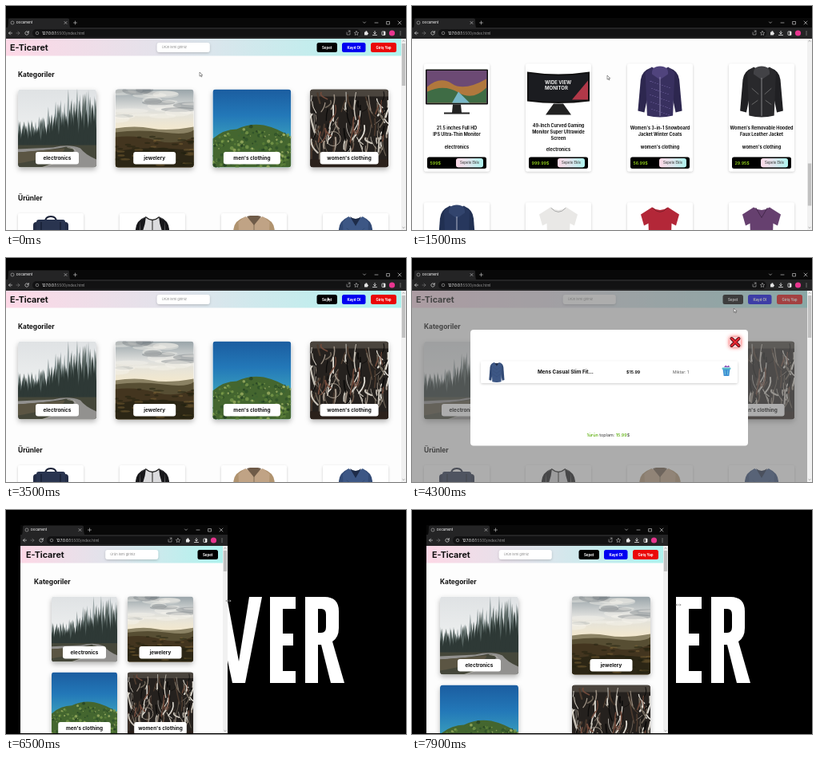
Recreate the animation shown at these times as an HTML page. Size 500 px wide and 281 px high, loop 8 s.

```html
<!DOCTYPE html>
<html lang="tr">
<head>
<meta charset="utf-8">
<title>E-Ticaret</title>
<style>
html, body { margin: 0; width: 100%; height: 100%; overflow: hidden; background: #000; }
#stage { display: block; width: 100vw; height: 100vh; font-family: Inter, "Open Sans", sans-serif; }
</style>
</head>
<body>
<svg id="stage" viewBox="0 0 500 281">
  <defs id="defs"></defs>
  <g id="scene"></g>
</svg>
<script>
const LOOP = 8000, STEP = 100;

// ---- drawing helpers ----
const rect = (x, y, w, h, fill, r = 0, more = '') =>
  `<rect x="${x}" y="${y}" width="${w}" height="${h}" rx="${r}" fill="${fill}" ${more}/>`;
const path = (d, fill = 'none', more = '') => `<path d="${d}" fill="${fill}" ${more}/>`;
const line = (d, color, width = .7) =>
  path(d, 'none', `stroke="${color}" stroke-width="${width}" stroke-linecap="round" stroke-linejoin="round"`);
const circle = (x, y, r, fill, more = '') => `<circle cx="${x}" cy="${y}" r="${r}" fill="${fill}" ${more}/>`;
const text = (x, y, size, str, fill = '#111', weight = 700, anchor = 'start') =>
  `<text x="${x}" y="${y + size * .36}" font-size="${size}" fill="${fill}" font-weight="${weight}" text-anchor="${anchor}">${str}</text>`;
const move = (x, y, body, scale = 1) => `<g transform="translate(${x} ${y}) scale(${scale})">${body}</g>`;
const mirror = body => body + `<g transform="translate(82 0) scale(-1 1)">${body}</g>`;
const use = id => `<use href="#${id}"/>`;
const SHADOW = 'filter="url(#shadow)"';

function random(seed) {
  return () => (seed = (seed * 16807) % 2147483647) / 2147483647;
}
const repeat = (n, fn) => Array.from({ length: n }, (_, i) => fn(i)).join('');
const clamp = v => Math.min(1, Math.max(0, v));

// keys: [time, ...values], linear between neighbours
function at(keys, t) {
  let i = 0;
  while (i < keys.length - 2 && t >= keys[i + 1][0]) i++;
  const [a, b] = [keys[i], keys[i + 1]];
  const k = clamp((t - a[0]) / (b[0] - a[0]));
  return a.slice(1).map((v, j) => v + (b[j + 1] - v) * k);
}

// ---- category pictures, 98 x 98 ----
function forest() {
  const rnd = random(11);
  const trees = (n, color, size) => repeat(n, i => {
    const x = i / (n - 1) * 98 + rnd() * 3;
    const h = (30 + 30 * clamp((x - 25) / 42)) * size * (.78 + rnd() * .35);
    return path(`M${x} ${72 - h}L${x + 4.5} 74H${x - 4.5}Z`, color);
  });
  return rect(0, 0, 98, 98, 'url(#mist)') + trees(20, '#9aa5a6', 1.2) + trees(28, '#55625f', 1) +
    trees(32, '#2e3936', .8) + rect(0, 70, 98, 28, '#45473a') +
    path('M0 79Q38 77 60 72Q76 74 66 82Q52 91 30 98H98V88Q84 82 78 74Q64 68 44 73L0 75Z', '#92918f') +
    line('M30 98Q62 88 71 80Q76 75 62 73', '#c9c6bd', .6) + path('M0 79Q40 76 58 74Q62 82 0 93Z', '#5b5543');
}
function valley() {
  const rnd = random(23);
  return rect(0, 0, 98, 98, 'url(#clouds)') +
    repeat(26, i => `<ellipse cx="${rnd() * 98}" cy="${rnd() * 42}" rx="${8 + rnd() * 16}" ry="${1.5 + rnd() * 4}" fill="${i % 3 ? '#f7f5ee' : '#6e777b'}" opacity=".4"/>`) +
    path('M0 49Q25 45 45 49T98 47V98H0Z', '#8b8264') + path('M0 54Q30 50 60 54T98 51V98H0Z', '#574e33') +
    path('M0 60Q25 57 50 64T98 60V98H0Z', '#43351f') + path('M0 78Q40 70 98 77V98H0Z', '#2c2615') +
    repeat(60, i => `<ellipse cx="${rnd() * 98}" cy="${58 + rnd() * 38}" rx="${2 + rnd() * 5}" ry="1.2" fill="${i % 3 ? '#21200f' : '#7c6235'}" opacity=".5"/>`);
}
function coast() {
  const rnd = random(7);
  const greens = ['#2c4f29', '#5c8038', '#7d9c4c', '#233f22', '#a3b566', '#3d6433'];
  return rect(0, 0, 98, 98, 'url(#sea)') + path('M0 62Q14 50 30 50Q46 42 64 45Q82 49 98 60V98H0Z', '#44662f') +
    repeat(240, i => {
      const x = rnd() * 98, top = 45 + Math.abs(x - 54) * .28;
      return circle(x, top + rnd() * (98 - top), .6 + rnd() * 1.8, greens[i % 6], 'opacity=".75"');
    });
}
function tools() {
  const rnd = random(41);
  const shades = ['#c9c3b8', '#6f6558', '#9b8f82', '#4b3a2e', '#e0dcd3', '#70493a', '#0c0b0a'];
  return rect(0, 0, 98, 98, '#25211e') + rect(0, 0, 98, 9, '#4a443d') + repeat(125, i => {
    const x = rnd() * 98, y = 2 + rnd() * 72, l = 5 + rnd() * 19;
    return line(`M${x} ${y}q${rnd() * 6 - 3} ${l / 2} ${rnd() * 16 - 8} ${l}`, shades[i % 7], .5 + rnd() * 1.8);
  }) + line('M20 62a9 9 0 1 0 18 0a9 9 0 1 0-18 0', '#a79c8f', 1) + rect(0, 88, 98, 10, '#2b211b');
}

// ---- product pictures, 82 x 65 ----
const garment = (body, sleeve = body, trim = '', width = 1) =>
  `<g transform="translate(41 0) scale(${width} 1) translate(-41 0)">` +
  mirror(path('M31 2Q21 6 20 17L17 56L24 58L30 25Z', sleeve)) +
  path('M32 1Q41 8 50 1L57 8L55 62Q41 66 27 62L25 8Z', body) + '</g>' + trim;
const zip = (color, y = 6) => line(`M41 ${y}V62`, color, .9);
const tee = (body, trim = '') => mirror(path('M31 3L17 12L21 26L29 22Z', body)) +
  path('M31 3Q41 10 51 3L56 10L54 63H28L26 10Z', body) + trim;
const monitor = (screen, extra) => rect(2, 4, 78, 44, '#111', 1) + rect(3.5, 5.5, 75, 41, screen) + extra +
  path('M36 48H46L47 58H57V60H25V58H35Z', '#222');
const hood = color => path('M31 10Q30 0 41 0T51 10L41 17Z', color);

const art = {
  backpack: rect(19, 8, 44, 55, '#232c45', 4) + line('M34 8Q34 1 41 1T48 8', '#1c2338', 2) +
    mirror(rect(14, 36, 8, 25, '#1c253b', 2)) + rect(23, 5, 36, 27, '#29344f', 3) +
    rect(24, 37, 34, 23, '#202a42', 2) + rect(36, 20, 9, 9, '#b98455', 1) + mirror(rect(28, 8, 2, 52, '#1b243a')),
  raglan: garment('#dcdcde', '#17171a', mirror(path('M33 1L25 7L26 26Q32 14 33 1Z', '#17171a')) +
    line('M41 6V20', '#555', 1.4) + line('M33 2Q41 9 49 2', '#222', 1.4)),
  jacket: garment('#c0a385', '#b0936f', zip('#7e6a53') + path('M32 1L41 12L50 1L46 0H36Z', '#6f5b48') +
    mirror(rect(24, 23, 11, 9, '#a98d6c', 1) + rect(25, 43, 10, 11, '#aa8e6e', 1)), 1.22),
  sweater: garment('#3d5785', '#324a75', path('M34 1L41 13L48 1Q41 7 34 1Z', '#1e2c49') +
    mirror(line('M30 16L41 24M29 27L41 35M29 38L41 46', '#304870', .8))),
  chain: `<g fill="none" stroke="#777" stroke-width="3" stroke-dasharray="2 .7"><path d="M38 4Q58 4 59 28Q58 57 38 58Q18 54 22 27Q24 8 38 4"/></g>` + circle(34, 5, 4, '#aaa'),
  band: `<ellipse cx="41" cy="36" rx="34" ry="20" fill="none" stroke="#aeb0b2" stroke-width="8"/><ellipse cx="41" cy="34" rx="34" ry="20" fill="none" stroke="#e3e4e5" stroke-width="3"/>`,
  gems: `<ellipse cx="41" cy="40" rx="27" ry="21" fill="none" stroke="#b5babd" stroke-width="6"/>` +
    repeat(9, i => circle(13 + i * 7, 18 - Math.sin(i / 8 * 3.14) * 8, 5, i % 2 ? '#8d979d' : '#dfe5e8')) + circle(41, 13, 10, '#cdd6da'),
  studs: mirror(circle(26, 25, 13, '#c68a76') + circle(26, 25, 10, '#b6454d') + line('M18 17L34 33M34 17L18 33', '#eec2b2', 2)),
  drive: rect(18, 2, 46, 62, '#202126', 4) + rect(20, 3, 42, 59, '#2b2c32', 3) + path('M20 42L62 10V60H20Z', '#18191d') + circle(27, 57, 1.8, '#999'),
  redDisk: rect(4, 9, 74, 51, '#242427', 2) + rect(6, 11, 70, 47, '#1a1a1d', 1) + text(31, 22, 6.2, 'SSD MORE', '#eee', 600) +
    line('M28 29H65', '#b32424', 1) + rect(35, 39, 14, 14, '#d32027'),
  blueDisk: rect(4, 9, 74, 50, '#101722', 2) + repeat(30, i => {
    const x = i % 6 * 4, y = Math.floor(i / 6) * 4;
    return rect(17 + x, 18 + y, 2.5, 2.5, i % 3 ? '#177cc0' : '#2fa6bd', 0, 'transform="rotate(12 28 28)"');
  }) + rect(47, 23, 9, 9, '#e9edf0') + rect(5, 45, 72, 13, '#d7dde1') + text(55, 52, 5, '256GB', '#222'),
  blueDrive: rect(20, 2, 43, 62, '#263daa', 4) + rect(22, 2, 41, 62, '#1c1d22', 4) + path('M24 6H60L24 49Z', '#31333a') + circle(31, 57, 2, '#aaa'),
  landscape: monitor('#6c4a74', path('M4 26Q20 12 35 22T78 16V46H4Z', '#b0783d') + path('M4 32Q25 22 43 33T78 27V46H4Z', '#3f6c45') +
    path('M35 46L43 32L57 46Z', '#78b7c7')),
  curved: path('M2 7Q41 13 80 7V44Q41 49 2 44Z', '#111') + path('M4 9Q41 15 78 9V42Q41 47 4 42Z', '#1b1c20') +
    text(24, 20, 6, 'WIDE VIEW', '#eee', 700) + text(24, 27, 6, 'MONITOR', '#eee', 700) + path('M58 42L78 18V42Z', '#b13848') + path('M35 47H47L57 61H25Z', '#222'),
  snow: garment('#38305f', '#2d274f', hood('#50447d') + zip('#978fb9', 14) + repeat(45, i => circle(29 + i * 7 % 25, 19 + i * 11 % 43, .6, '#7666a8')), 1.15),
  leather: garment('#29292c', '#202023', hood('#424246') + zip('#8f8f92', 15) + mirror(line('M29 28L37 35M29 48L36 43', '#777', .8)), 1.12),
  rain: garment('#27375d', '#213052', hood('#32446d') + zip('#c0c5d4', 15)),
  blouse: tee('#e9e8e6', line('M32 4Q41 14 50 4', '#aaa', 1)),
  red: tee('#b32738', line('M32 4Q41 14 50 4', '#82202b', 1)),
  violet: tee('#66406f', line('M34 4L41 16L48 4', '#45294c', 1)),
};
const pictures = [forest(), valley(), coast(), tools()];

const categories = [['electronics', 54], ['jewelery', 53], ["men's clothing", 71], ["women's clothing", 73]];
const MEN = "men's clothing", WOMEN = "women's clothing", TECH = 'electronics', GEM = 'jewelery';
const rows = [
  [2, [['backpack', 'Skovhalden - Rollbag No. 4|Rucksack, Fits 15 Laptops', MEN, '109.95'],
    ['raglan', 'Mens Casual Premium Slim|Fit T-Shirts', MEN, '22.3'],
    ['jacket', 'Mens Cotton Jacket', MEN, '55.99'], ['sweater', 'Mens Casual Slim Fit', MEN, '15.99']]],
  [4, [['chain', "Women's Gold and Silver|Station Chain Bracelet", GEM, '695'], ['band', 'Solid Gold Petite|Ring', GEM, '168'],
    ['gems', 'White Gold Plated|Princess Ring', GEM, '9.99'], ['studs', 'Rose Gold Plated|Stainless Steel Double|Flared Earrings', GEM, '10.99']]],
  [4, [['drive', 'QN 2TB Meadows Portable|External Hard Disk - USB|3.0', TECH, '64'],
    ['redDisk', 'Torvelo SSD MORE 1TB|Internal SSD - SATA III 6|Gb/s', TECH, '109'],
    ['blueDisk', 'Walnut Ridge 256GB SSD 3D|NAND M31 SLC Cache|Performance Boost SATA III|2.5', TECH, '109'],
    ['blueDrive', 'QN 4TB Player Drive|Works with Quillboard 6|Portable External Hard|Disk', TECH, '114']]],
  [4, [['landscape', '21.5 inches Full HD|IPS Ultra-Thin Monitor', TECH, '599'], ['curved', '49-Inch Curved Gaming|Monitor Super Ultrawide|Screen', TECH, '999.99'],
    ['snow', "Women's 3-in-1 Snowboard|Jacket Winter Coats", WOMEN, '56.99'], ['leather', "Women's Removable Hooded|Faux Leather Jacket", WOMEN, '29.95']]],
  [3, [['rain', 'Rain Jacket Women|Windbreaker Striped', WOMEN, '39.99'], ['blouse', "Women's Short Sleeve|Boat Neck", WOMEN, '9.85'],
    ['red', "Women's Short Sleeve|Moisture Tee", WOMEN, '7.95'], ['violet', 'T Shirt Casual|Cotton Short', WOMEN, '12.99']]],
];

function productCard([id, title, kind, price], lines) {
  const bar = 85 + lines * 8, names = title.split('|');
  const gap = (bar - 70 - names.length * 8 - 8) / 3;
  return rect(0, 0, 82, bar + 18, '#fff', 2.5, SHADOW) + move(0, 3, use(id)) +
    names.map((s, i) => text(41, 69 + gap + 4 + i * 8, 5.5, s, '#111', 700, 'middle')).join('') +
    text(41, 69 + gap * 2 + names.length * 8 + 4, 5.6, kind, '#111', 650, 'middle') +
    rect(4, bar, 74, 14.5, '#000', 2.5) + text(7.5, bar + 7.5, 5.4, price + '$', '#a5ee1c', 500) +
    rect(40, bar + 1.5, 34, 11.5, 'url(#candy)', 3) + text(57, bar + 7.2, 4.3, 'Sepete Ekle', '#444', 500, 'middle');
}
function productRows() {
  let y = 219;
  return rows.map(([lines, items]) => {
    const row = items.map((item, i) => move(15 + i * 127, y, productCard(item, lines))).join('');
    y += 103 + lines * 8 + 39;
    return row;
  }).join('');
}

const gradient = (id, stops, dir = '') => `<linearGradient id="${id}" ${dir}>` +
  stops.map((c, i) => `<stop offset="${i / (stops.length - 1)}" stop-color="${c}"/>`).join('') + '</linearGradient>';
const DOWN = 'x2="0" y2="1"';
document.getElementById('defs').innerHTML =
  gradient('candy', ['#fdd8e6', '#dce5ec', '#aef3ee']) + gradient('sea', ['#1b5da0', '#2378b8', '#3aa0bd', '#4fa9a8'], DOWN) +
  gradient('clouds', ['#98a3a8', '#dfe0dd', '#f2e8cf', '#c3b183', '#6b6140'], DOWN) + gradient('mist', ['#dfe2e4', '#eceeee', '#c5cbcb'], DOWN) +
  '<filter id="shadow" x="-20%" y="-20%" width="140%" height="150%"><feDropShadow dx="0" dy="1" stdDeviation="1.4" flood-opacity=".2"/></filter>' +
  '<filter id="deep" x="-20%" y="-20%" width="140%" height="150%"><feDropShadow dx="0" dy="3" stdDeviation="3" flood-opacity=".28"/></filter>' +
  '<filter id="glow" x="-60%" y="-60%" width="220%" height="220%"><feDropShadow dx="0" dy="0" stdDeviation="2.5" flood-color="#f33"/></filter>' +
  '<clipPath id="round"><rect width="98" height="98" rx="4"/></clipPath>' +
  Object.entries(art).map(([id, body]) => `<g id="${id}">${body}</g>`).join('') +
  pictures.map((body, i) => `<g id="category${i}" clip-path="url(#round)">${body}</g>`).join('') +
  `<g id="products">${productRows()}</g>`;

// ---- browser ----
function chrome(w) {
  const grey = '#b8b8b8', r = w;
  return rect(0, 15, w, 13, '#080808') + path('M1 28Q3 27 3 17Q3 15.500 5 15.500H77Q79 15.500 79 17Q79 27 81 28Z', '#242425') +
    rect(0, 27, w, 14, '#242425') + circle(8, 21, 2, 'none', `stroke="${grey}" stroke-width=".6"`) +
    text(13, 21, 4.1, 'Document', '#f0f0f0', 500) + line('M73 19.500l3 3m0-3l-3 3M84.500 21h4m-2-2v4', grey) +
    line(`M${r - 53.5} 20l1.500 1.500l1.500-1.500M${r - 39} 21h4M${r - 24} 19.500h3.500v3.500h-3.500zM${r - 10} 19l4 4m0-4l-4 4`, '#ddd', .6) +
    line('M3.500 34h4m-2-2l-2 2l2 2', '#ddd') + line('M13 34h4m-2-2l2 2l-2 2', '#777') +
    line('M28 33a2.200 2.200 0 1 0 .2 1.500M28.300 31.500v1.700h-1.700', '#ddd') +
    rect(33, 29, w - 90, 10, '#121213', 5) + circle(39, 34, 1.8, 'none', `stroke="${grey}" stroke-width=".6"`) +
    `<text x="45" y="35.600" font-size="4.500" fill="#eee" font-weight="500">127.0.0.1<tspan fill="#999" font-weight="400">:5500/index.html</tspan></text>` +
    line(`M${r - 74} 33v3h4v-2m-2-1l2-2m-2 0h2v2`, grey, .6) +
    line(`M${r - 62} 31.500l.8 1.700l1.900.2l-1.400 1.300l.4 1.800l-1.700-.9l-1.700.9l.4-1.800l-1.400-1.300l1.900-.2z`, grey, .6) +
    rect(r - 52, 32.5, 4, 4, '#e4e4e4', .6) + circle(r - 49.6, 32.3, 1.1, '#e4e4e4') + circle(r - 48, 34.6, 1, '#e4e4e4') +
    line(`M${r - 39} 31.500v3.500m-1.500-1.500l1.500 1.500l1.500-1.500M${r - 41.500} 36.500h5`, '#eee', .8) +
    rect(r - 30, 32, 4, 4.500, 'none', .5, 'stroke="#eee" stroke-width=".8"') + rect(r - 28, 32, 2, 4.5, '#eee') +
    circle(r - 17.5, 34, 3.6, '#e8358f') + [32, 34, 36].map(y => circle(r - 7, y, .5, '#ddd')).join('');
}

function header(w, pad, compact) {
  const buttons = [['Sepet', '#000', 25.5, 6], ['Kayıt Ol', '#0000f0', 29.5, 6.5], ['Giriş Yap', '#ea0808', 32, 0]].slice(0, compact ? 1 : 3);
  const total = compact ? 25.5 : 99.5;
  let x = w - 6 - total;
  const search = pad + 50 + (x - pad - 50 - 66) / 2;
  return rect(0, 0, w, 21.5, 'url(#candy)') + text(pad, 11, 10.7, 'E-Ticaret') +
    rect(search, 5, 66, 12, '#fff', 3, SHADOW) + text(search + 6, 11, 4.1, 'Ürün ismi giriniz', '#888', 400) +
    buttons.map(([label, color, width, gap]) => {
      const out = rect(x, 5, width, 12, color, 2.5) + text(x + width / 2, 11, 4.4, label, '#fff', 700, 'middle');
      x += width + gap;
      return out;
    }).join('');
}

function categoryGrid(w, full, compact) {
  const size = compact ? 82 : 98, columns = full ? 4 : 2;
  const left = compact ? 39 : full ? 15 : 17;
  const pitch = compact ? 95 : full ? 121.7 : w - 16 - 98 - left;
  return categories.map(([name, width], i) => {
    const x = left + i % columns * pitch, y = 63.5 + Math.floor(i / columns) * (size + 13);
    const pill = Math.min(width, size * .8);
    return rect(x, y, size, size, '#fff', 4, 'filter="url(#deep)"') + move(x, y, use('category' + i), size / 98) +
      rect(x + (size - pill) / 2, y + size - 19.5, pill, 15.5, '#fff', 3) +
      text(x + size / 2, y + size - 11.7, 6.4, name, '#111', 700, 'middle');
  }).join('');
}

function modal(opacity) {
  const bin = path('M388.500 139H397.500L396.300 148H389.700Z', '#3d8fd3') + rect(387.5, 137.5, 11, 2.2, '#56b9c9', 1) +
    path('M390 137L392 134.500L394 136L396 134.500L397 137Z', '#8d54b8') + line('M391 141l.5 5M395 141l-.5 5', '#7ed3e0', .8);
  return `<g opacity="${opacity}">` + rect(0, 41, 494, 240, '#6e6e6e', 0, 'opacity=".56"') + rect(73, 90, 347, 145.5, '#fff', 4) +
    rect(397, 99, 14, 13, '#ffd5d9', 2, 'filter="url(#glow)"') + line('M399.500 101l9 9m0-9l-9 9', '#4d1015', 4) + line('M399.500 101l9 9m0-9l-9 9', '#e92632', 2.4) +
    rect(86, 129.5, 321, 27.5, '#fff', 2, SHADOW) + move(89.5, 130.5, use('sweater'), .4) +
    text(157, 143, 6.3, 'Mens Casual Slim Fit...') + text(268, 143, 5.2, '$15.99') + text(326, 143, 5.1, 'Miktar: 1', '#555', 400) + bin +
    `<text x="218.500" y="224" font-size="5.400" fill="#333"><tspan fill="#68b51d" font-weight="600">1ürün</tspan> toplam: <tspan fill="#68b51d" font-weight="600">15.99</tspan>$</text></g>`;
}

function browser(w, full, scroll) {
  const compact = w < 285, pageWidth = w - 6, height = full ? 240 : 235;
  return chrome(w) + `<svg y="41" width="${w}" height="${height}">` + rect(0, 0, w, height, '#fdfdfd') +
    move(0, -scroll, header(pageWidth, full ? 5 : 7, compact) + text(full ? 15 : 17, 44.5, 8.4, 'Kategoriler') +
      categoryGrid(pageWidth, full, compact) + (full ? text(15, 199.5, 8.4, 'Ürünler') + use('products') : '')) +
    rect(pageWidth, 0, 6, height, '#f1f1f1') + rect(pageWidth + .8, 6 + scroll * .217, 4.4, full ? 53 : 26, '#c1c1c1') +
    line(`M${w - 4.200} 3.500l1.200-1.200l1.200 1.200M${w - 4.200} ${height - 3.500}l1.200 1.200l1.200-1.200`, '#777', .6) + '</svg>';
}

// tall wall lettering behind the restored window
const wallpaper = path('M260 109H276L291 190L304 109H320L299 217H283Z', '#fff') +
  path('M330 109H362V124H346V155H359V170H346V202H362V217H330Z', '#fff') +
  path('M374 109H398Q416 109 416 127V148Q416 160 408 165L423 217H406L394 169H390V217H374ZM390 124V154H394Q400 154 400 147V131Q400 124 394 124Z', '#fff', 'fill-rule="evenodd"');

// ---- motion ----
const scrollKeys = [[0, 0], [800, 539], [1200, 800], [1400, 800], [2000, 161], [2800, 161], [3200, 0]];
const cursorKeys = [[0, 242, 83], [800, 244, 87], [1500, 244, 87], [2100, 204, 181], [2600, 452, 206], [2800, 452, 206], [3500, 402, 49],
  [4100, 402, 49], [4900, 403, 105], [5600, 403, 105], [6000, 477, 20], [6400, 278, 114], [6800, 278, 114], [7200, 299, 116], [7900, 333, 119]];
const modalKeys = [[3700, 0], [4000, 1], [5500, 1], [5800, 0]];
const edgeKeys = [[7200, 259], [7900, 302]];
const RESTORE = 6100;

function pointer(t) {
  const [x, y] = at(cursorKeys, t);
  return move(x, y, t >= 6400
    ? line('M-3 0H3M-2 -1L-3 0L-2 1M2 -1L3 0L2 1', '#999', .8)
    : path('M0 0V5.200L1.300 4.100L2.200 6L3 5.600L2.200 3.800H3.800Z', '#fff', 'stroke="#333" stroke-width=".5"'));
}

function frame(t) {
  if (t >= RESTORE) return wallpaper + move(18, 4, browser(at(edgeKeys, t)[0], false, 0)) + pointer(t);
  const shade = at(modalKeys, t)[0];
  return browser(500, true, at(scrollKeys, t)[0]) + (shade ? modal(shade) : '') + pointer(t);
}

const scene = document.getElementById('scene');
const start = performance.now();
let shown = -1;
function tick() {
  const t = Math.floor((performance.now() - start) % LOOP / STEP) * STEP;
  if (t !== shown) scene.innerHTML = frame(shown = t);
  requestAnimationFrame(tick);
}
tick();
</script>
</body>
</html>
```
